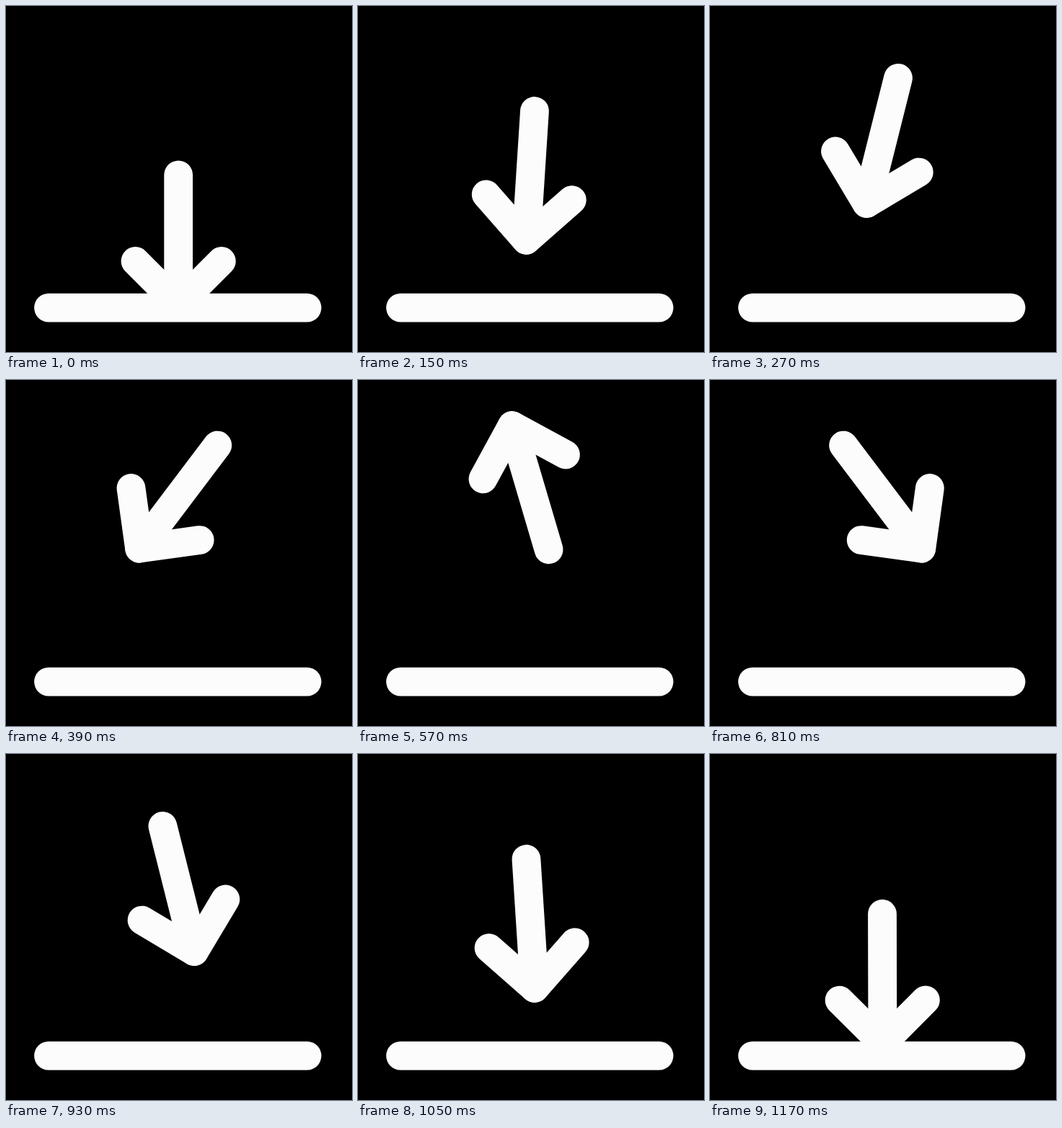
An HTML page with a canvas for the animation above (1200 ms loop, 480 by 480 pixels).

```html
<!DOCTYPE html>
<html lang="en">
<head>
<meta charset="utf-8">
<title>Arrow toss</title>
<style>
  html, body { margin: 0; width: 100%; height: 100%; overflow: hidden; background: #000; }
  canvas { display: block; width: 480px; height: 480px; }
</style>
</head>
<body>
<canvas id="stage" width="480" height="480"></canvas>
<script>
const ctx = document.getElementById('stage').getContext('2d');
const LOOP = 1200, STEP = 30;
const CENTER_X = 239.2, LOW_Y = 324, HIGH_Y = 149;
const HALF_SHAFT = 89.7, WING = 59.7;

function cubicBezier(x1, y1, x2, y2) {
  const at = (s, a, b) => 3 * (1 - s) ** 2 * s * a + 3 * (1 - s) * s * s * b + s ** 3;
  return x => {
    let lo = 0, hi = 1;
    for (let i = 0; i < 40; i++) {
      const mid = (lo + hi) / 2;
      if (at(mid, x1, x2) < x) lo = mid; else hi = mid;
    }
    return at((lo + hi) / 2, y1, y2);
  };
}

const rise = cubicBezier(1 / 6, 1 / 6, 0.25, 1);
const turn = cubicBezier(1, 0, 5 / 6, 5 / 6);

function polyline(...points) {
  ctx.beginPath();
  points.forEach(([x, y]) => ctx.lineTo(x, y));
  ctx.stroke();
}

function draw(time) {
  const t = Math.floor((time + 0.5) / STEP) * STEP % LOOP;
  const phase = t / (LOOP / 2);
  const falling = phase > 1;
  const p = falling ? 2 - phase : phase;
  const y = LOW_Y + (HIGH_Y - LOW_Y) * rise(p);
  const angle = Math.PI * turn(p) * (falling ? -1 : 1);

  ctx.fillStyle = '#000';
  ctx.fillRect(0, 0, 480, 480);
  ctx.strokeStyle = '#fcfcfc';
  ctx.lineWidth = 39.8;
  ctx.lineCap = ctx.lineJoin = 'round';

  polyline([59, 418.6], [417.6, 418.6]);

  ctx.save();
  ctx.translate(CENTER_X, y);
  ctx.rotate(angle);
  polyline([0, -HALF_SHAFT], [0, HALF_SHAFT]);
  polyline([-WING, HALF_SHAFT - WING], [0, HALF_SHAFT], [WING, HALF_SHAFT - WING]);
  ctx.restore();
}

const start = performance.now();
function tick() {
  draw(performance.now() - start);
  requestAnimationFrame(tick);
}
tick();
</script>
</body>
</html>
```
